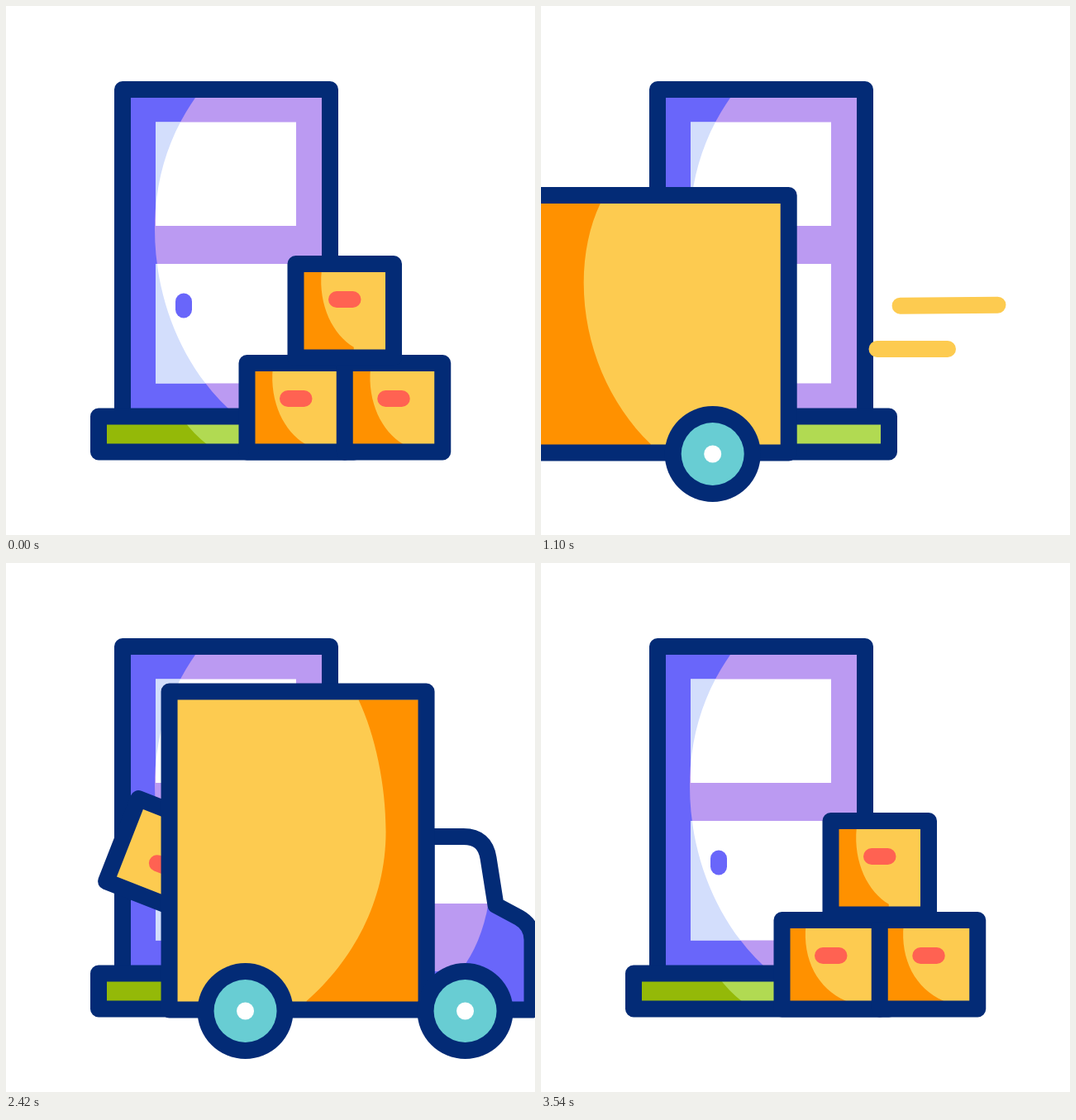
Write an HTML page with a canvas that moves like this. It is 640 by 640 pixels and loops after 3600 ms.

```html
<!DOCTYPE html>
<html lang="en">
<head>
<meta charset="utf-8">
<title>Delivery</title>
<style>
  html, body { margin: 0; height: 100%; overflow: hidden; background: #fff; }
  canvas { display: block; width: 100vw; height: 100vh; }
</style>
</head>
<body>
<canvas width="640" height="640"></canvas>
<script>
const LOOP = 3600;
const NAVY = '#032b76', PURPLE = '#6966fa', LILAC = '#bb9af2', PALE = '#d3defc', WHITE = '#fff',
  YELLOW = '#fdcb50', ORANGE = '#ff9100', RED = '#ff6252', TEAL = '#68cdd3',
  GREEN = '#94b908', LIME = '#b1da52';

const ctx = document.querySelector('canvas').getContext('2d');
ctx.lineCap = ctx.lineJoin = 'round';

const clamp = u => Math.min(1, Math.max(0, u));
const rect = (x1, y1, x2, y2) => `M${x1} ${y1}H${x2}V${y2}H${x1}Z`;

function fill(color, d) {
  ctx.fillStyle = color;
  ctx.fill(new Path2D(d));
}

function stroke(color, d) {
  ctx.strokeStyle = color;
  ctx.lineWidth = 20;
  ctx.stroke(new Path2D(d));
}

function disc(color, x, y, r) {
  ctx.fillStyle = color;
  ctx.beginPath();
  ctx.arc(x, y, r, 0, 7);
  ctx.fill();
}

function clipped(d, paint) {
  ctx.save();
  ctx.clip(new Path2D(d));
  paint();
  ctx.restore();
}

function drawDoor() {
  const frame = rect(141, 101, 392, 497);
  const panes = rect(181, 140.5, 351, 266) + rect(181, 312, 351, 456.5);
  const shade = 'M141 111H229C196 158 180 212 180 270C180 352 212 434 270 488H141Z';
  fill(LILAC, frame);
  fill(PURPLE, shade);
  fill(WHITE, panes);
  clipped(panes, () => fill(PALE, shade));
  stroke(PURPLE, 'M215 357.5V367.5');
  stroke(NAVY, frame);

  const step = rect(112, 496.5, 421, 539.5);
  fill(LIME, step);
  fill(GREEN, 'M112 500H214Q226 517 245 532H112Z');
  stroke(NAVY, step);
}

// half: half the height; bulge: how far the shade spreads at the bottom
function drawBox([x, y], angle, half, bulge) {
  const shape = rect(-59.25, -half, 59.25, half);
  const b = bulge / 3;
  ctx.save();
  ctx.translate(x, y);
  ctx.rotate(angle * Math.PI / 180);
  fill(YELLOW, shape);
  fill(ORANGE, `M-59 -48H${-28 - b}C${-32 - b} -6 ${-14 - b} 29 ${11 + bulge} 44V48H-59Z`);
  stroke(NAVY, shape);
  stroke(RED, `M-9.75 ${43 - half}H9.75`);
  ctx.restore();
}

// Faces left, with the left edge of the cargo box at x = 324
function drawTruck(top, sill, shade) {
  const cab = 'M334 331H289Q263 331 259 357L250 414L222 429Q206 438 206 456V540.5H334Z';
  const cargo = rect(334, top, 645, 540.5);
  fill(WHITE, cab);
  clipped(cab, () => {
    fill(PURPLE, rect(200, sill, 334, 541));
    fill(LILAC, `M259 ${sill}Q267 460 293 494H334V${sill}Z`);
  });
  stroke(NAVY, cab);
  fill(YELLOW, cargo);
  fill(ORANGE, `M334 ${top + 10}${shade}V540H334Z`);
  stroke(NAVY, cargo);
  for (const x of [287, 553]) {
    disc(NAVY, x, 542, 58);
    disc(TEAL, x, 542, 38);
    disc(WHITE, x, 542, 10.5);
  }
}

// Brakes in front of the door, then speeds off to the left
function pickup(t) {
  const x = 550 * (Math.max(0, 725 - t) / 513) ** 2 - 0.0508 * Math.max(0, t - 820) ** 1.5;
  ctx.save();
  ctx.translate(x - 106, 0);
  drawTruck(229, 416, 'H417C404 266 397 300 397 335C397 410 428 482 478 530');
  ctx.restore();
}

// Passes through to the right, slowing very slightly
function dropoff(t) {
  const s = t - 2420;
  ctx.save();
  ctx.translate(841.3 + 1.2475 * s - 0.0000765 * s * s, 0);
  ctx.scale(-1, 1);
  drawTruck(155.5, 412, 'H416C396 208 383 268 383 325C383 410 424 482 479 530');
  ctx.restore();
}

const SPOTS = { left: [350.75, 485.75], right: [469, 485.75], top: [409.75, 368.75] };
const LOW = 53.75, TALL = 56.75;

// Spins steadily and eases from a release point to its spot, one power per axis
function toss(t, { show, start, land, from, to, spin, power, half, bulge }) {
  if (t < show) return;
  const left = clamp((land - t) / (land - start));
  const pos = to.map((v, i) => v + (from[i] - v) * left ** power[i]);
  drawBox(pos, spin * Math.min(0, t - land), half, bulge);
}

const TOSSES = [
  { show: 2350, start: 2420, land: 2936, from: [194.3, 356], to: SPOTS.left,
    spin: 0.308, power: [5, 2.9], half: LOW, bulge: 7 },
  { show: 2440, start: 2660, land: 3040, from: [320.3, 315.5], to: SPOTS.right,
    spin: 0.308, power: [1.5, 1.2], half: LOW, bulge: 7 },
  { show: 2440, start: 2660, land: 3220, from: [454.3, 231.5], to: SPOTS.top,
    spin: -0.0232, power: [2, 1.5], half: TALL, bulge: 0 },
];

// A stroke drawn along its length, whose tail follows after a lag
function streak(t, x, y, length, slope, start, duration, lag) {
  const head = length * clamp((t - start) / duration);
  const tail = length * clamp((t - start - lag) / duration);
  if (head !== tail) stroke(YELLOW, `M${x + tail} ${y + slope * tail}L${x + head} ${y + slope * head}`);
}

function draw(t) {
  ctx.fillStyle = WHITE;
  ctx.fillRect(0, 0, 640, 640);
  drawDoor();

  if (t < 770) {
    drawBox(SPOTS.left, 0, LOW, 0);
    drawBox(SPOTS.right, 0, LOW, 0);
    drawBox(SPOTS.top, 0, TALL, 0);
  }
  for (const box of TOSSES) toss(t, box);

  if (t > 200 && t < 1400) pickup(t);
  if (t > 1900 && t < 2820) dropoff(t);

  // Puffs ahead of the braking truck
  streak(t, 91, 420, -29, 0, 490, 200, 60);
  streak(t, 85, 464.5, -39, 0, 431, 200, 70);
  streak(t, 85, 509, -30, 0, 490, 200, 60);
  // Speed lines behind each departing truck
  streak(t, 577, 361.5, -327, -0.008, 892, 480, 173);
  streak(t, 540, 415, -360, 0, 923, 480, 114);
  streak(t, 150.5, 207, 279, -0.012, 2500, 277, 160);
  streak(t, 90.5, 262, 359, -0.0225, 2470, 307, 190);
}

const start = performance.now();
function tick() {
  draw((performance.now() - start) % LOOP);
  requestAnimationFrame(tick);
}
tick();
</script>
</body>
</html>
```
